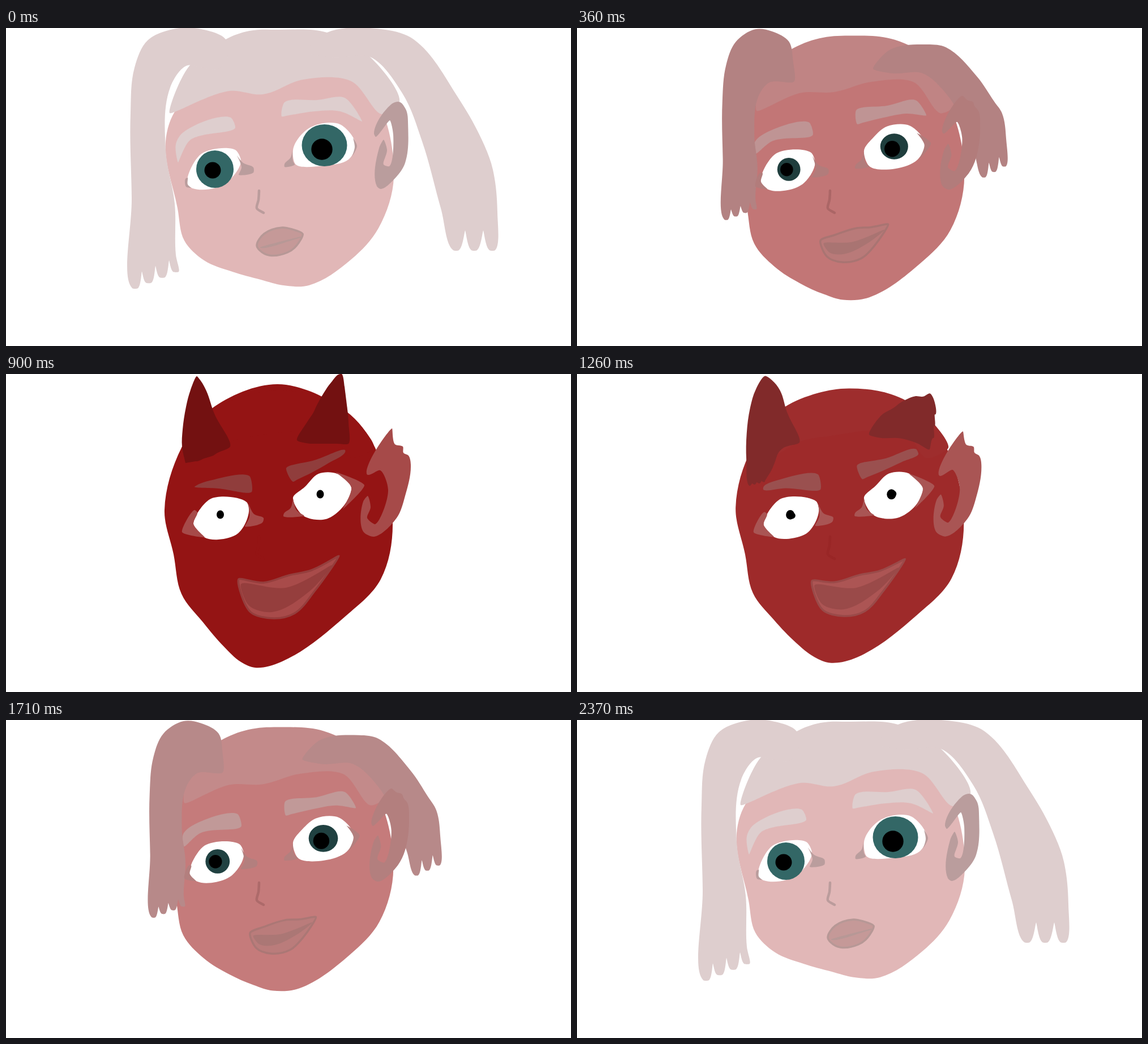
An HTML page that plays this animation: 998x561 px, repeating every 2.4 s.

```html
<!DOCTYPE html>
<html lang="en">
<head>
<meta charset="utf-8">
<title>Face morph</title>
<style>
html, body { margin: 0; width: 100%; height: 100%; overflow: hidden; background: #fff; }
svg { display: block; width: 100%; height: 100%; }
</style>
</head>
<body>
<svg id="stage" viewBox="0 0 998 561"></svg>
<script>
const numbers = text => text.match(/[\d.]+/g).map(Number);
const channels = hex => hex.match(/\w\w/g).map(h => parseInt(h, 16));
const mix = (a, b, p) => a.map((v, i) => v + (b[i] - v) * p);
const colour = ([a, b], p) => `rgb(${mix(channels(a), channels(b), p).map(Math.round)})`;
const stage = document.getElementById('stage');
const parts = [];

function add(tag, from, to, fill, stroke, width) {
  const node = document.createElementNS(stage.namespaceURI, tag);
  if (!fill) node.setAttribute('fill', 'none');
  if (stroke) {
    node.setAttribute('stroke-width', width);
    node.setAttribute('stroke-linejoin', 'round');
    node.setAttribute('stroke-linecap', 'round');
  }
  stage.append(node);
  parts.push({ node, tag, from: numbers(from), to: numbers(to), fill, stroke });
}
const shape = (...args) => add('path', ...args);
const disc = (...args) => add('ellipse', ...args);

// Strand tips spread evenly from one point to another, with notches between them.
function comb(ax, ay, bx, by, count, depth = 0, half = 0) {
  const points = [], side = Math.sign(bx - ax) * half;
  for (let i = 0; i <= 2 * (count - 1); i++) {
    const t = i / 2 / (count - 1), x = ax + (bx - ax) * t, y = ay + (by - ay) * t;
    if (i % 2) points.push(x, y - depth, x, y - depth);
    else points.push(x - side, y, x + side, y);
  }
  return ' ' + points;
}

const skin = ['e1b7b7', '941414'];
const fringe = ['decece', '941414'];
const hair = ['decece', '731111'];
const brow = ['decece', '903d3c'];
const fold = ['ba9d9d', 'a64a49'];
const white = ['ffffff', 'ffffff'];
const iris = ['336766', '000000'];
const black = ['000000', '000000'];
const lip = ['c59998', 'a84b4a'];
const mouth = ['b79896', '953e3d'];

// head and fringe
shape('302,142 282,200 303,318 315,375 350,410 400,430 450,444 490,454 535,454 610,408 658,353 685,262 650,120 600,85 480,80 380,90',
  '310,130 280,240 296,318 310,388 348,438 385,481 415,508 440,518 488,507 600,427 662,362 683,262 652,130 601,66 480,18 362,62', skin);
shape('289,150 395,111 454,117 525,91 610,94 664,152 695,130 643,51 567,8 480,3 430,5 388,20 323,68',
  '360,140 395,120 454,107 512,101 572,98 610,148 650,130 601,66 553,40 480,29 425,38 362,65 340,85', fringe);

// brows
shape('304,237 300,205 312,185 397,158 405,176 325,198', '333,199 334,198 360,188 430,180 434,208 375,202', brow);
shape('487,156 492,131 550,127 598,123 629,165 590,147 545,147 500,154',
  '507,190 495,166 545,152 599,134 599,138 570,157 540,174 515,186', brow);

// pigtails that shrink into horns
shape('222,300 220,150 227,70 250,22 300,1 345,2 388,20 391,52 375,72 318,67 290,105 282,215 298,310 300,400' + comb(300, 430, 228, 459, 4, 25, 5),
  '311,128 312,98 318,58 326,28 337,4 344,12 354,30 368,70 396,128 372,140 366,144 360,146 350,149 338,154' + comb(335, 154, 317, 157, 4), hair);
shape('529,42 567,8 670,3 720,20 800,125 845,207 860,250 868,325' + comb(859, 392, 795, 392, 3, 35, 5) + ' 768,318 735,200 700,115 643,51 575,52',
  '514,117 533,83 543,68 549,55 566,26 575,14 587,1 593,0' + comb(598, 22, 604, 70, 3) + ' 605,85 605,123 585,123 560,123 530,122', hair);

// ear
shape('650,186 680,135 692,130 698,132 703,138 708,148 710,165 705,238 690,262 662,284 655,279 659,212 667,197 673,215 667,241 677,244 684,188 678,163 653,192',
  '637,176 682,96 687,124 701,128 702,139 711,144 715,160 705,215 690,254 650,287 631,278 631,225 639,215 644,235 638,254 652,265 675,205 661,170 639,178', fold);

// eyes
shape('320,275 345,222 405,215 415,235 395,268 370,282 330,283', '331,265 362,220 425,226 429,243 410,281 375,292 350,288', white);
shape('507,215 520,190 545,172 590,170 618,205 605,232 560,243 512,241',
  '507,218 528,199 552,176 585,176 610,200 597,232 565,256 525,250', white);
disc('369,249,33,33', '382,250,1.4,1.4', iris);
disc('562.5,207,40,37', '557,212,1.4,1.4', iris);
disc('365,251,14.5,14.5', '378.5,248,6.5,7.5', black);
disc('558,214,18.7,18.7', '555,212,6.5,7.5', black);

// eye corners
shape('318,280 317,266 321,264 321,276 327,282', '311,279 333,240 338,244 331,264 351,288', fold);
shape('408,225 419,238 437,246 437,255 411,259 416,246', '428,228 438,247 455,254 453,262 422,269 430,252', fold);
shape('506,215 507,235 510,241 492,245 492,240 503,228', '507,220 513,240 527,250 490,251 491,246 503,236', fold);
shape('613,194 620,208 611,227 616,210', '582,173 633,196 595,238 610,200', fold);

// nose and mouth
shape('447,287 446,303 443,318 455,326', '447,287 446,303 443,318 455,326', null, ['bb9c9c', '941414'], 4.5);
shape('443,383 456,363 488,352 505,355 524,363 513,384 497,396 465,401 448,392',
  '411,362 455,368 500,355 540,346 588,321 545,383 510,422 473,431 432,420', lip, mouth, 3.5);
shape('450,387 480,379 520,369 500,375 475,383 458,387', '416,371 495,378 575,338 535,383 470,419 430,408', mouth, mouth, 2);

// Smooth curve through the points; the sharper the turn, the shorter the handles.
function curve(flat, open) {
  const n = flat.length / 2;
  const at = i => {
    const k = open ? Math.min(Math.max(i, 0), n - 1) : (i + n) % n;
    return [flat[2 * k], flat[2 * k + 1]];
  };
  const unit = (a, b) => {
    const x = b[0] - a[0], y = b[1] - a[1], d = Math.hypot(x, y) || 1;
    return [x / d, y / d];
  };
  const tangents = Array.from({ length: n }, (_, i) => {
    const a = unit(at(i - 1), at(i)), b = unit(at(i), at(i + 1));
    const pull = 0.35 * (1 + a[0] * b[0] + a[1] * b[1]) / 2;
    return unit([0, 0], [a[0] + b[0], a[1] + b[1]]).map(v => v * pull);
  });
  let d = `M${at(0)}`;
  for (let i = 0; i < (open ? n - 1 : n); i++) {
    const a = at(i), b = at(i + 1), s = tangents[i], e = tangents[(i + 1) % n];
    const len = Math.hypot(b[0] - a[0], b[1] - a[1]);
    d += `C${a.map((v, k) => v + s[k] * len)} ${b.map((v, k) => v - e[k] * len)} ${b}`;
  }
  return open ? d : d + 'Z';
}

// 0 is the girl, 1 the devil; the way back slows down at its end.
function progress(time) {
  const step = Math.floor(time % 2400 / 30);
  if (step <= 30) return step / 30;
  if (step <= 38) return 1;
  if (step <= 64) return 1 - (step - 38) / 30;
  return 4 / 30 * ((79 - step) / 15) ** 2.2;
}

function draw(p) {
  for (const { node, tag, from, to, fill, stroke } of parts) {
    const now = mix(from, to, p);
    if (tag === 'path') node.setAttribute('d', curve(now, !fill));
    else ['cx', 'cy', 'rx', 'ry'].forEach((name, i) => node.setAttribute(name, now[i]));
    if (fill) node.setAttribute('fill', colour(fill, p));
    if (stroke) node.setAttribute('stroke', colour(stroke, p));
  }
}

const start = performance.now();
let shown = -1;
function tick() {
  const p = progress(performance.now() - start);
  if (p !== shown) draw(shown = p);
  requestAnimationFrame(tick);
}
tick();
</script>
</body>
</html>
```
